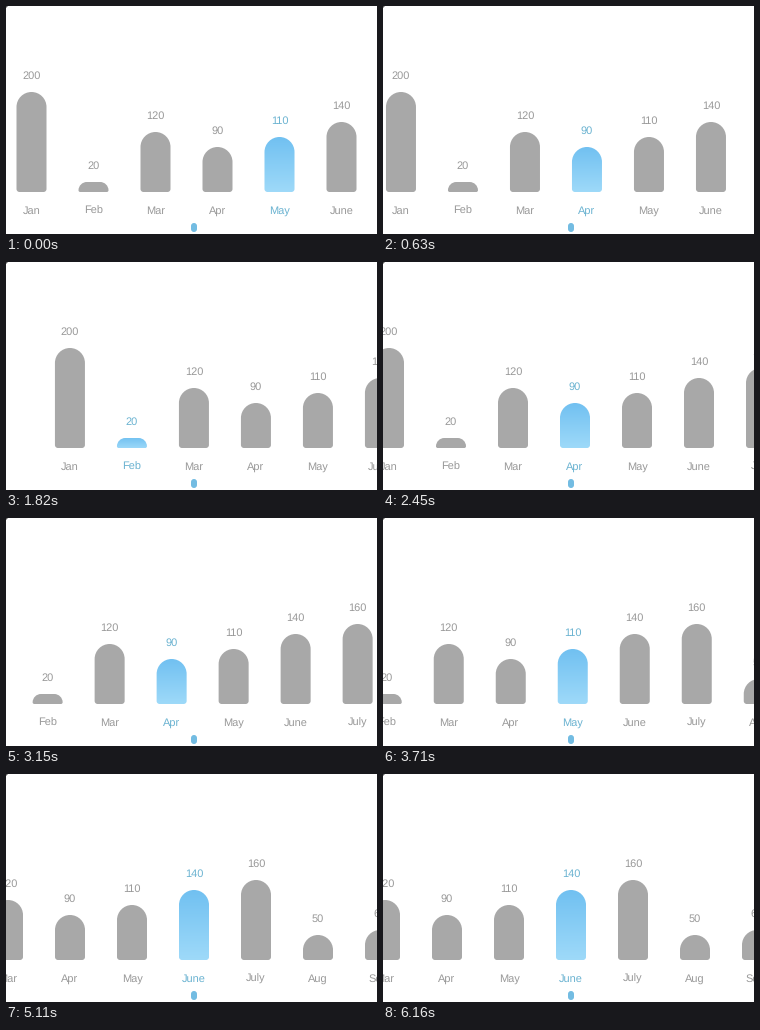
Recreate the animation shown at these times as a matplotlib script. Size 371x228 px, loop 6.3 s.

```python
import numpy as np
import matplotlib.pyplot as plt
from matplotlib.animation import FuncAnimation
from matplotlib.colors import LinearSegmentedColormap
from matplotlib.patches import FancyBboxPatch, PathPatch, Polygon
from matplotlib.path import Path
from matplotlib.transforms import Affine2D

W, H = 371, 228
DPI = 64  # a power of two keeps the pixel size exact
FRAMES, STEP_MS = 90, 70
CENTER, GAP, BAR_W, BASE = 188, 62, 30, 186
GREY, TEXT_GREY, TEXT_BLUE, DOT_BLUE = "#a8a8a8", "#999999", "#6bb3d1", "#73bce2"

MONTHS = ["Jan", "Feb", "Mar", "Apr", "May", "June", "July", "Aug", "Sept"]
VALUES = [200, 20, 120, 90, 110, 140, 160, 50, 60]

plt.rcParams["font.family"] = "Liberation Sans"
plt.rcParams["text.hinting"] = "none"


def drag(start, end, steps, power=1.6):
    """Finger drag: soft start, long slow-down."""
    u = 1 - (1 - np.arange(1, steps + 1) / steps) ** power
    return list(start + (end - start) * u * u * (3 - 2 * u))


def snap(start, end, steps):
    """Release: the remaining distance halves at every step."""
    left = 0.5 ** np.arange(1, steps + 1)
    left[-1] = 0
    return list(end + (start - end) * left)


def snapped(index):
    """Position of the first bar when the given bar is centred."""
    return CENTER - GAP * index


def build_timeline():
    """First bar's x and the selected index for every frame."""
    xs, picks = [25.5, 30.0], [4, 4]

    def add(values, pick):
        xs.extend(values)
        picks.extend([pick] * len(values))

    def hold(n):
        add([xs[-1]] * n, picks[-1])

    def pull(end, steps, power=1.6):
        add(drag(xs[-1], end, steps, power), picks[-1])

    def release(index, steps):
        add(snap(xs[-1], snapped(index), steps), index)

    release(3, 6)
    hold(1)
    pull(129, 10, 2.38)
    release(1, 3)
    hold(1)
    pull(34, 9, 1.64)
    hold(1)
    release(3, 6)
    hold(5)
    pull(-46, 6)
    hold(1)
    release(4, 5)
    hold(4)
    pull(-108, 8)
    hold(1)
    release(5, 5)
    hold(4)
    pull(-136, 5)
    hold(1)
    release(5, 5)
    hold(FRAMES - len(xs))
    return xs, picks


def bar_path(height):
    """Bar around x = 0 with a round top and slightly rounded feet."""
    top_r, foot_r = BAR_W / 2, 3
    scale = min(1, height / (top_r + foot_r))
    a, b = top_r * scale, foot_r * scale
    k = 0.4477
    l, r, t, y = -BAR_W / 2, BAR_W / 2, BASE - height, BASE
    points = [
        (l, y - b), (l, t + a),
        (l, t + a * k), (l + a * k, t), (l + a, t),
        (r - a, t),
        (r - a * k, t), (r, t + a * k), (r, t + a),
        (r, y - b),
        (r, y - b * k), (r - b * k, y), (r - b, y),
        (l + b, y),
        (l + b * k, y), (l, y - b * k), (l, y - b),
        (l, y - b),
    ]
    curve = [Path.CURVE4] * 3
    codes = ([Path.MOVETO, Path.LINETO] + curve + [Path.LINETO] + curve
             + [Path.LINETO] + curve + [Path.LINETO] + curve + [Path.CLOSEPOLY])
    return Path(points, codes)


fig = plt.figure(figsize=(W / DPI, H / DPI), dpi=DPI, facecolor="white")
ax = fig.add_axes([0, 0, 1, 1])

blues = LinearSegmentedColormap.from_list("blues", ["#70c0f1", "#9fdaf9"])
glow = ax.imshow(np.linspace(0, 1, 128)[:, None], cmap=blues, aspect="auto",
                 interpolation="bilinear", zorder=2)
ax.set_xlim(0, W)
ax.set_ylim(H, 0)
ax.set_autoscale_on(False)
ax.axis("off")

paths = [bar_path(v / 2) for v in VALUES]
bars, captions = [], []
for month, value, path in zip(MONTHS, VALUES, paths):
    bars.append(ax.add_patch(PathPatch(path, fc=GREY, lw=0)))
    style = dict(size=11 * 72 / DPI, ha="center", va="baseline", clip_on=True)
    captions.append((ax.text(0, BASE - value / 2 - 13, value, **style),
                     ax.text(0, 208, month, **style)))

ax.add_patch(FancyBboxPatch((188, 220), 0, 3, boxstyle="round,pad=3",
                            fc=DOT_BLUE, lw=0))
ax.add_patch(Polygon([(0, 0), (2, 0), (0, 2)], fc="#555555", lw=0))

xs, picks = build_timeline()


def draw(frame):
    first, pick = xs[frame], picks[frame]
    for i, (bar, texts) in enumerate(zip(bars, captions)):
        x = first + GAP * i
        shift = Affine2D().translate(x, 0)
        bar.set_transform(shift + ax.transData)
        bar.set_visible(i != pick)
        for text in texts:
            # clipping hides text whose anchor lies outside the axes
            text.set_clip_on(False)
            text.set_x(x)
            text.set_color(TEXT_BLUE if i == pick else TEXT_GREY)
        if i == pick:
            top = BASE - VALUES[i] / 2
            glow.set_extent((x - 17, x + 17, BASE + 1, top - 1))
            glow.set_clip_path(paths[i], shift + ax.transData)
    ax.set_xlim(0, W)
    ax.set_ylim(H, 0)
    return []


anim = FuncAnimation(fig, draw, frames=FRAMES, interval=STEP_MS,
                     repeat=True, repeat_delay=0, blit=False)
plt.show()
```
